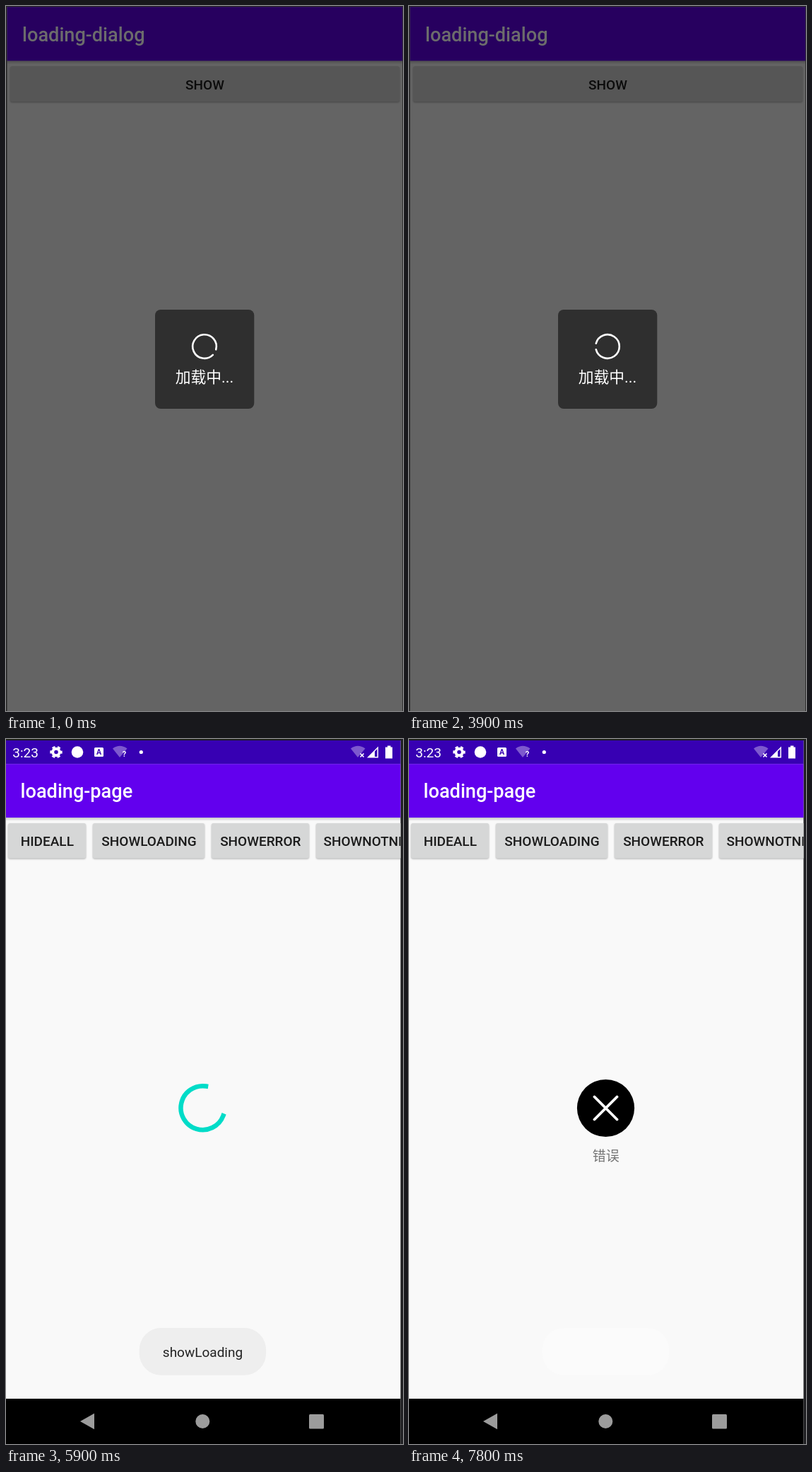
Write an HTML page that moves like this. It is 562 px wide and 996 px high and loops after 8 s.

```html
<!DOCTYPE html>
<html lang="zh-CN">
<head>
<meta charset="utf-8">
<title>Loading demo</title>
<style>
html, body { margin: 0; width: 100%; height: 100%; overflow: hidden; background: #202023; }
svg { display: block; width: 100vw; height: 100vh; }
text { font-family: Roboto, "Noto Sans CJK SC", "Noto Sans CJK", sans-serif; font-size: 19px; }
.title { font-size: 27.15px; font-weight: 500; }
.btn { font-weight: 500; }
.mid { text-anchor: middle; }
.lift { filter: drop-shadow(0 1px 1.2px rgba(0, 0, 0, .3)); }
</style>
</head>
<body>
<svg viewBox="0 0 562 996" preserveAspectRatio="none">
  <defs>
    <linearGradient id="shade" x2="0" y2="1">
      <stop offset="0" stop-opacity=".2"/>
      <stop offset="1" stop-opacity="0"/>
    </linearGradient>
    <clipPath id="screen"><rect y="2" width="558.5" height="994"/></clipPath>
    <clipPath id="clipLoad"><rect x="123" y="119" width="158" height="49.5" rx="2.7"/></clipPath>
    <clipPath id="clipError"><rect x="291" y="119" width="138" height="49.5" rx="2.7"/></clipPath>
  </defs>

  <g id="dialogScreen">
    <rect width="562" height="996" fill="#242424"/>
    <rect x="1.5" y="1.2" width="559.7" height="995" fill="#646464"/>
    <rect x="1.5" y="1.2" width="559.7" height="76.3" fill="#27005f"/>
    <rect x="1.5" y="77.5" width="559.7" height="5" fill="url(#shade)"/>
    <text class="title" x="23" y="49.5" fill="#6c6c6c">loading-dialog</text>
    <rect class="lift" x="6" y="85.3" width="551" height="50" rx="2.7" fill="#565656"/>
    <text class="btn mid" x="281.5" y="117.5" fill="#0b0b0b">SHOW</text>
    <rect x="211" y="429" width="140.3" height="140" rx="8" fill="#2f2f2f"/>
    <path id="ring" fill="none" stroke="#fff" stroke-width="2.6" stroke-linecap="round"/>
    <text class="mid" x="281" y="531.5" fill="#fff" style="font-size:21.8px">加载中...</text>
  </g>

  <g id="pageScreen" clip-path="url(#screen)">
    <rect width="562" height="996" fill="#f9f9f9"/>
    <rect width="562" height="35.5" fill="#3700b3"/>
    <rect y="35.3" width="562" height="75.7" fill="#6200ee"/>
    <rect y="111" width="562" height="5" fill="url(#shade)"/>

    <g fill="#fff">
      <text x="9.3" y="26">3:23</text>
      <circle cx="71" cy="18.5" r="4.8" fill="none" stroke="#fff" stroke-width="4"/>
      <circle cx="71" cy="18.5" r="7.4" fill="none" stroke="#fff" stroke-width="2.6"
        stroke-dasharray="4.2 3.55" stroke-dashoffset="2.1"/>
      <circle cx="101" cy="18.5" r="8.3"/>
      <rect x="125" y="12" width="13" height="13" rx="1.5"/>
      <text class="mid" x="131.5" y="22.3" fill="#3700b3" style="font-size:10.5px;font-weight:700">A</text>
      <path id="wifi" d="M151 13.5Q161 6 171.5 13.5L161 26Z" opacity=".35"/>
      <text class="mid" x="167.5" y="25" style="font-size:11px;font-weight:700">?</text>
      <circle cx="191.3" cy="18.5" r="2.6"/>
      <path d="M488 13.5Q498 6 508.500 13.5L498 26Z" opacity=".35"/>
      <path d="M501.500 20.500l5 5m0-5l-5 5" stroke="#fff" stroke-width="1.7"/>
      <path d="M511 26.500L527 10.500V26.500ZM522 17.500V25H525.500V14Z" fill-rule="evenodd"/>
      <path d="M540 9.500h4.500v2h2.500v16h-10v-16h3z"/>
      <text class="title" x="20.500" y="83.3">loading-page</text>
    </g>

    <g fill="#d6d7d7">
      <rect class="lift" x="3" y="119" width="110" height="49.500" rx="2.700"/>
      <rect class="lift" x="123" y="119" width="158" height="49.500" rx="2.700"/>
      <rect class="lift" x="291" y="119" width="138" height="49.500" rx="2.700"/>
      <rect class="lift" x="439" y="119" width="190" height="49.500" rx="2.700"/>
    </g>
    <g clip-path="url(#clipLoad)"><circle id="rippleLoad" cx="202" cy="144"/></g>
    <g clip-path="url(#clipError)"><circle id="rippleError" cx="360" cy="144"/></g>
    <g class="btn" fill="#1b1b1b">
      <text class="mid" x="58.300" y="151">HIDEALL</text>
      <text class="mid" x="202.500" y="151">SHOWLOADING</text>
      <text class="mid" x="360.300" y="151">SHOWERROR</text>
      <text x="449.500" y="151">SHOWNOTNETWORK</text>
    </g>

    <path id="spinner" fill="none" stroke="#00dcc8" stroke-width="6.500" stroke-linecap="square"/>
    <g id="error">
      <circle cx="278.500" cy="521.500" r="40.600"/>
      <path d="M262.500 505.500l32 32m0-32l-32 32" stroke="#fff" stroke-width="3.800" stroke-linecap="round"/>
      <text class="mid" x="278.700" y="596" fill="#757575">错误</text>
    </g>
    <g id="toast">
      <rect id="toastBox" x="188.700" y="832" width="179.500" height="66.800" rx="31"/>
      <text id="toastText" class="mid" x="278.500" y="873" fill="#222">showLoading</text>
    </g>

    <rect y="932" width="562" height="64"/>
    <g fill="#9c9c9c">
      <path d="M105 964L125 952.800V975.200Z"/>
      <circle cx="278.300" cy="964" r="10"/>
      <rect x="429" y="954" width="21" height="20.500" rx="1.500"/>
    </g>
  </g>
</svg>
<script>
const LOOP = 8000, STEP = 100, PAGE_AT = 4100;
const LOAD_TAP = 5500, LOAD_AT = 5600, ERROR_TAP = 7300, ERROR_AT = 7400;
// [start, count] of each run of ring steps
const RUNS = [[100, 2], [400, 3], [800, 2], [1100, 3], [1500, 3], [1900, 2],
  [2200, 4], [2700, 2], [3000, 3], [3400, 2], [3700, 3]];

const el = id => document.getElementById(id);
const clamp = v => Math.min(1, Math.max(0, v));
const show = (id, on) => el(id).setAttribute('display', on ? 'inline' : 'none');
const set = (id, attrs) => {
  for (const k in attrs) el(id).setAttribute(k, attrs[k]);
};

// Clockwise arc; angles in degrees, 0 = right
function arc(cx, cy, r, from, to) {
  const pt = a => {
    const q = a * Math.PI / 180;
    return (cx + r * Math.cos(q)).toFixed(2) + ' ' + (cy + r * Math.sin(q)).toFixed(2);
  };
  return `M${pt(from)}A${r} ${r} 0 ${to - from > 180 ? 1 : 0} 1 ${pt(to)}`;
}

// Height of a cubic from (x0,0) to (x3,1) with flat ends
function ease(x, x0, x1, x2, x3) {
  if (x <= x0) return 0;
  if (x >= x3) return 1;
  let lo = 0, hi = 1;
  for (let i = 0; i < 24; i++) {
    const s = (lo + hi) / 2, c = 1 - s;
    const v = x0 * c * c * c + 3 * x1 * s * c * c + 3 * x2 * s * s * c + x3 * s * s * s;
    if (v < x) lo = s; else hi = s;
  }
  return lo * lo * (3 - 2 * lo);
}

function drawRing(t) {
  let n = 0;
  for (const [start, count] of RUNS) {
    if (t >= start) n += Math.min(count, Math.floor((t - start) / STEP) + 1);
  }
  const gap = 30 + 30 * n;
  set('ring', { d: arc(281, 481, 16.8, gap + 15, gap + 345) });
}

function drawSpinner(t) {
  const p = ((t - 5147) / 1333) % 1;
  const turn = 47.5 + (t - 5900) * 0.1923 + p * 90 - 90;
  const tail = 270 * ease(p, 0.5, 0.7, 0.6, 1);
  const head = Math.max(270 * ease(p, 0, 0.2, 0.1, 0.5), tail + 0.5);
  set('spinner', { d: arc(278.5, 521.2, 31, turn + tail, turn + head) });
}

function drawRipple(id, dt, width) {
  const on = dt >= 0 && dt < 400;
  show(id, on);
  if (on) set(id, {
    r: width * (0.45 + 0.2 * clamp(dt / 200)),
    opacity: 0.15 * clamp((dt + 80) / 150) * (1 - dt / 400)
  });
}

function drawToast(t) {
  const enter = clamp((t - LOAD_AT + 100) / 350);
  const leave = clamp((t - 7150) / 600) ** 2;
  const tone = Math.round(238 + 13 * leave);
  set('toast', { opacity: enter });
  set('toastBox', { fill: `rgb(${tone},${tone},${tone})` });
  set('toastText', { opacity: 1 - leave });
}

function draw(t) {
  const page = t >= PAGE_AT, loading = t >= LOAD_AT && t < ERROR_AT;
  show('dialogScreen', !page);
  show('pageScreen', page);
  if (!page) return drawRing(t);
  show('spinner', loading);
  show('error', t >= ERROR_AT);
  show('toast', t >= LOAD_AT);
  if (loading) drawSpinner(t);
  drawToast(t);
  drawRipple('rippleLoad', t - LOAD_TAP, 158);
  drawRipple('rippleError', t - ERROR_TAP, 138);
}

const begin = performance.now();
function tick() {
  const t = (performance.now() - begin) % LOOP;
  draw(Math.floor(t / STEP) * STEP);
  requestAnimationFrame(tick);
}
tick();
</script>
</body>
</html>
```
